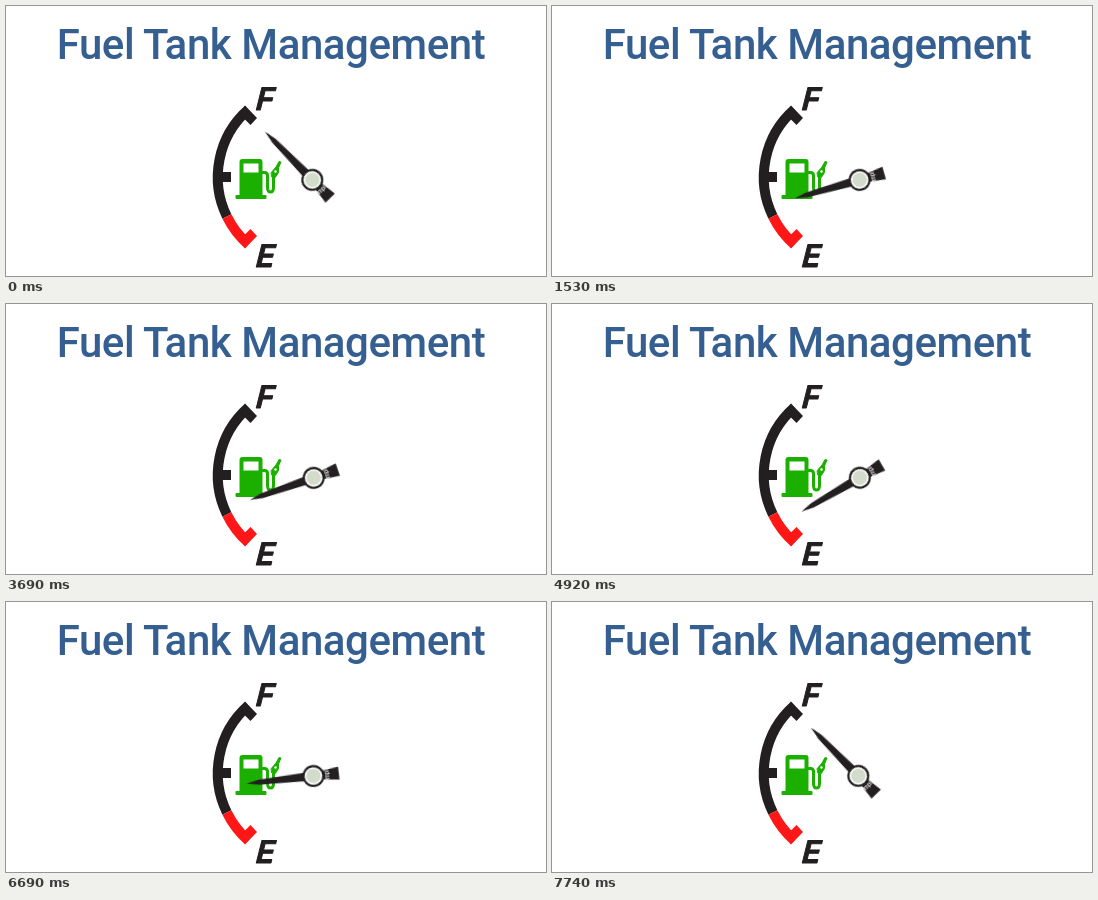
Animation, 540 px wide and 270 px high, one loop 7800 ms. Source, as an HTML page:

```html
<!DOCTYPE html>
<html lang="en">
<head>
<meta charset="utf-8">
<title>Fuel Tank Management</title>
<style>
  html, body {
    margin: 0;
    width: 100%;
    height: 100%;
    overflow: hidden;
    background: #fff;
  }
  svg { display: block; width: 540px; height: 270px; }
  .title {
    font: 500 42px Roboto, "Open Sans", sans-serif;
    letter-spacing: -.45px;
    fill: #355f91;
    text-anchor: middle;
  }
  .mark {
    font: 600 31px Inter, "Open Sans", sans-serif;
    fill: #231f20;
    stroke: #231f20;
    stroke-width: 1;
    stroke-linejoin: round;
  }
  .tiny {
    font: 700 5.5px Inter, sans-serif;
    fill: #d5d5d5;
    text-anchor: middle;
  }
  .dark { fill: #231f20; }
  .red { fill: #ff1617; }
  .green { fill: #1bb000; }
  .arc { fill: none; stroke-width: 10; }
  .hose, .nozzle {
    stroke: #1bb000;
    stroke-linecap: round;
    stroke-linejoin: round;
  }
  .hose { fill: none; stroke-width: 3; }
  .needle {
    transform-origin: 0 0;
    animation: swing 7800ms cubic-bezier(.37, 0, .63, 1) infinite;
  }
  /* Positive angles lift the tip toward full. */
  @keyframes swing {
    0%, 99.62%, 100% { transform: rotate(45.6deg); }
    21.54% { transform: rotate(-17deg); }
    34.62% { transform: rotate(-27.3deg); }
    46.79% { transform: rotate(-19deg); }
    62.18% { transform: rotate(-30deg); }
    75% { transform: rotate(-41.5deg); }
  }
</style>
</head>
<body>
<svg viewBox="0 0 540 270">
  <text class="title" x="265" y="53">Fuel Tank Management</text>

  <!-- Scale -->
  <path class="arc" stroke="#231f20" d="M242.2 103.6A90 90 0 0 0 220.9 210.5"/>
  <path class="arc" stroke="#ff1617" d="M220.9 210.5A90 90 0 0 0 242.2 238.4"/>
  <path class="dark" d="M239 99.5L251 112L244.5 119L234.5 109Z"/>
  <path class="red" d="M239 242.5L251 230L244.5 223L234.5 233Z"/>
  <rect class="dark" x="214" y="166" width="11" height="10"/>
  <text class="mark" transform="translate(248 104) skewX(-14)">F</text>
  <text class="mark" transform="translate(248 260.500) skewX(-14)">E</text>

  <!-- Pump -->
  <g transform="translate(.5 0)">
    <path class="green" fill-rule="evenodd"
      d="M233 190V156Q233 153 236 153H253Q256 153 256 156V190Z M237 157.500V166.500H252V157.500Z"/>
    <rect class="green" x="229" y="189" width="31" height="4" rx="1"/>
    <path class="hose" d="M256 166.500H258Q261 166.500 261 169.500V181.500Q261 186 264 186Q267 186 267 181.500V172"/>
    <path class="green nozzle" d="M264.800 166.500L269.500 161L272.500 155.500L274.500 156L272 162L272 166.500L268.800 171.500L265.500 171Z"/>
    <circle cx="269" cy="165.500" r="1.200" fill="#fff"/>
  </g>

  <!-- The hub sits slightly off the centre of rotation. -->
  <g transform="translate(307 172.800)">
    <g class="needle">
      <g transform="translate(.3 1.200)">
        <path class="dark" d="M-67.500 0L-55 -2.500L-8 -4.200L8 -4.200L25.500 -6.500V6.500L8 4.200L-8 4.200L-55 2.500Z"/>
        <text class="tiny" transform="translate(13.500 0) rotate(-90)" y="2">mpl</text>
        <circle class="dark" r="11"/>
        <circle r="8.800" fill="#fff"/>
        <circle r="7.200" fill="#d3dccb"/>
      </g>
    </g>
  </g>
</svg>
</body>
</html>
```
